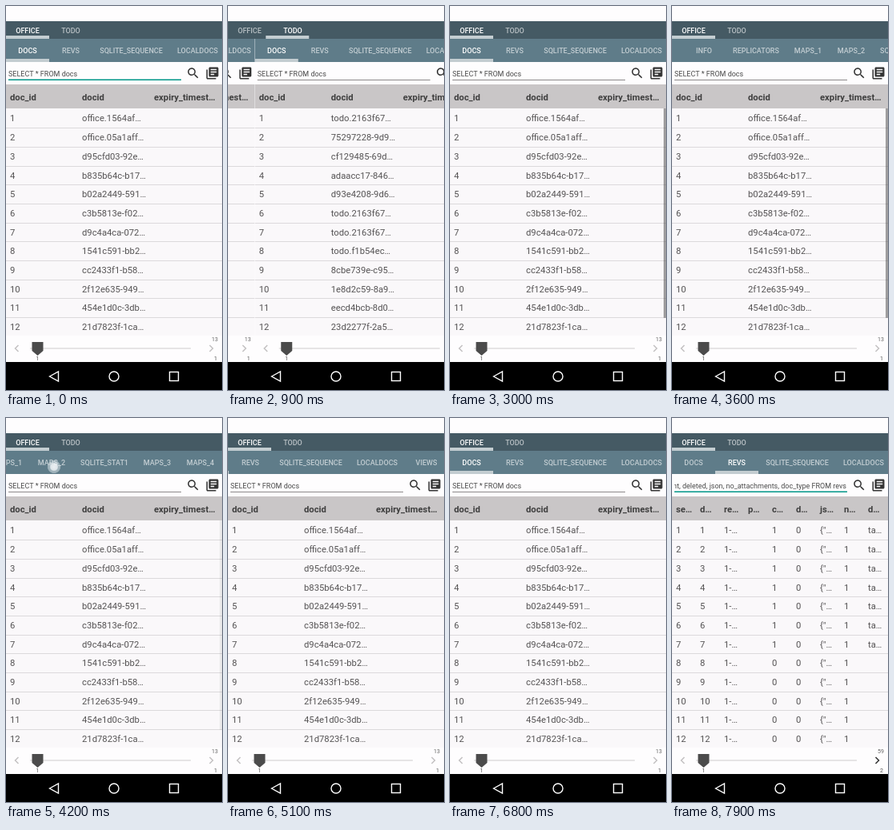
An HTML page with a canvas for the animation above (8 s loop, 270 by 480 pixels).

```html
<!DOCTYPE html>
<html lang="en">
<head>
<meta charset="utf-8">
<title>Database browser</title>
<style>
  html, body { margin: 0; width: 100%; height: 100%; overflow: hidden; background: #000; }
  canvas { display: block; width: 270px; height: 480px; }
</style>
</head>
<body>
<canvas id="stage"></canvas>
<script>
const W = 270, H = 480, LOOP = 8000, STEP = 100;
const TOP = 128, BOTTOM = 412, NAV = 445, ROW = 23.7;
const PANEL = '#fefdfe';
const canvas = document.getElementById('stage');
const ctx = canvas.getContext('2d');
const ratio = window.devicePixelRatio || 1;
canvas.width = W * ratio;
canvas.height = H * ratio;

const font = (size, weight = 400) => `${weight} ${size}px Roboto, sans-serif`;
const clamp = v => Math.max(0, Math.min(1, v));
const progress = (t, from, to) => clamp((t - from) / (to - from));
const easeOut = u => 1 - (1 - u) ** 3;
const mix = (a, b, u) => a + (b - a) * u;

function rect(x, y, w, h, color) {
  ctx.fillStyle = color;
  ctx.fillRect(x, y, w, h);
}

function text(str, x, y, face, color, align = 'left') {
  ctx.font = face;
  ctx.fillStyle = color;
  ctx.textAlign = align;
  ctx.fillText(str, x, y);
}

function path(points, closed) {
  ctx.beginPath();
  points.forEach(([x, y], i) => i ? ctx.lineTo(x, y) : ctx.moveTo(x, y));
  if (closed) ctx.closePath();
}

function stroke(color, width) {
  ctx.strokeStyle = color;
  ctx.lineWidth = width;
  ctx.stroke();
}

function clipped(x, y, w, h, draw) {
  ctx.save();
  ctx.beginPath();
  ctx.rect(x, y, w, h);
  ctx.clip();
  draw();
  ctx.restore();
}

// Piecewise linear value through [time, value] points
function track(points, t) {
  const i = points.findIndex(p => p[0] > t);
  if (i === 0) return points[0][1];
  if (i < 0) return points[points.length - 1][1];
  const [t0, a] = points[i - 1], [t1, b] = points[i];
  return mix(a, b, (t - t0) / (t1 - t0));
}

// Tab strips
function makeTabs(names) {
  ctx.font = font(9, 500);
  let x = 0;
  return names.map(name => {
    const w = Math.max(54, Math.round(ctx.measureText(name).width + 18));
    const tab = { name, x, w };
    x += w;
    return tab;
  });
}

const databases = makeTabs(['OFFICE', 'TODO']);
const tables = makeTabs(['DOCS', 'REVS', 'SQLITE_SEQUENCE', 'LOCALDOCS', 'VIEWS', 'INFO',
  'REPLICATORS', 'MAPS_1', 'MAPS_2', 'SQLITE_STAT1', 'MAPS_3', 'MAPS_4']);
const lastTab = tables[tables.length - 1];
const maxScroll = lastTab.x + lastTab.w - W;

const scrollTrack = [
  [3200, 0], [3300, 30], [3400, 110], [3500, 215], [3600, 315], [3700, 400], [3800, 455],
  [3900, maxScroll], [4200, maxScroll], [4300, maxScroll - 40], [4400, maxScroll - 125],
  [4500, maxScroll - 215], [4600, 200], [4700, 145], [4800, 105], [4900, 76], [5000, 60],
  [5100, 53], [5300, 53], [5400, 38], [5500, 15], [5600, 0]
];

// Finger contacts: start, end, from point, to point
const touches = [
  [300, 600, 80, 31, 80, 31],
  [2200, 2500, 27, 31, 27, 31],
  [3200, 3600, 235, 66, 50, 66],
  [4100, 4201, 60, 61, 60, 61],
  [4201, 4500, 60, 61, 225, 61],
  [5200, 6000, 62, 61, 243, 61],
  [7100, 7400, 80, 58, 80, 58]
];

function drawTabs(tabs, active, pos, base, bottom) {
  tabs.forEach((tab, i) => text(tab.name, tab.x + tab.w / 2, base, font(9, 500),
    i === active ? '#fff' : 'rgba(255,255,255,.62)', 'center'));
  const a = tabs[0], b = tabs[1];
  rect(mix(a.x, b.x, pos), bottom - 4, mix(a.w, b.w, pos), 4, '#c3cdd1');
}

// Table contents
const docHead = ['doc_id', 'docid', 'expiry_timest…'];
const docRows = ids => ids.split(' ').map((id, i) => [i + 1, id + '…', '']);
const officeRows = docRows('office.1564af office.05a1aff d95cfd03-92e b835b64c-b17 b02a2449-591 ' +
  'c3b5813e-f02 d9c4a4ca-072 1541c591-bb2 cc2433f1-b58 2f12e635-949 454e1d0c-3db 21d7823f-1ca');
const todoRows = docRows('todo.2163f67 75297228-9d9 cf129485-69d adaacc17-846 d93e4208-9d6 ' +
  'todo.2163f67 todo.2163f67 todo.f1b54ec 8cbe739e-c95 1e8d2c59-8a9 eecd4bcb-8d0 23d2277f-2a5');
const revRows = Array.from({ length: 12 }, (_, i) =>
  [i + 1, i + 1, '1-…', '', i < 7 ? 1 : 0, 0, '{"…', 1, i < 7 ? 'ta…' : '']);

const docsQuery = 'SELECT * FROM docs';
const office = { head: docHead, rows: officeRows, total: 13, pages: 1, query: docsQuery };
const todo = { head: docHead, rows: todoRows, total: 19, pages: 1, query: docsQuery };
const revs = {
  head: ['se…', 'd…', 're…', 'p…', 'c…', 'd…', 'js…', 'n…', 'd…'],
  rows: revRows, total: 59, pages: 2, fromEnd: true,
  query: 'SELECT sequence, doc_id, revid, parent, current, deleted, json, no_attachments, doc_type FROM revs'
};

// Icons on a 24 unit grid
const searchIcon = new Path2D('M15.5 14h-.79l-.28-.27C15.41 12.59 16 11.11 16 9.5 16 5.91 13.09 3 9.5 3' +
  'S3 5.91 3 9.5 5.91 16 9.5 16c1.61 0 3.09-.59 4.23-1.57l.27.28v.79l5 4.99L20.49 19z' +
  'm-6 0C7.01 14 5 11.99 5 9.5S7.01 5 9.5 5 14 7.01 14 9.5 11.99 14 9.5 14z');
const pagesIcon = new Path2D('M4 6H2v14c0 1.1.9 2 2 2h14v-2H4z' +
  'M20 2H8c-1.1 0-2 .9-2 2v12c0 1.1.9 2 2 2h12c1.1 0 2-.9 2-2V4c0-1.1-.9-2-2-2z' +
  'm-1 9H9V9h10zm-4 4H9v-2h6zm4-8H9V5h10z');

function drawIcon(icon, x, y) {
  ctx.save();
  ctx.translate(x, y);
  ctx.scale(.75, .75);
  ctx.fillStyle = '#333';
  ctx.fill(icon, 'evenodd');
  ctx.restore();
}

function drawQuery(data, focused) {
  rect(0, 70, W, 28, PANEL);
  clipped(3, 72, 216, 19, () => data.fromEnd
    ? text(data.query, 218, 88, font(9), '#4a4a4a', 'right')
    : text(data.query, 3, 88, font(9), '#4a4a4a'));
  if (focused) rect(3, 91.5, 216, 1.5, '#009688');
  else rect(3, 92, 216, 1, '#8b8989');
  drawIcon(searchIcon, 225, 75);
  drawIcon(pagesIcon, 249, 75);
}

function drawTable(data, barAlpha) {
  const col = W / data.head.length;
  rect(0, TOP, W, BOTTOM - TOP, '#faf8fa');
  rect(0, 98, W, TOP - 98, '#c9c6c7');
  data.head.forEach((label, i) => text(label, i * col + 5, 118, font(11.25, 700), '#3f3f3f'));
  clipped(0, TOP, W, BOTTOM - TOP, () => data.rows.forEach((cells, r) => {
    const y = TOP + r * ROW;
    const base = Math.floor(y + 16.9);
    cells.forEach((cell, i) => text(cell, i * col + 5, base, font(11.25), '#555354'));
    rect(0, Math.ceil(y + ROW), W, 1, '#dcd9dc');
  }));
  const view = BOTTOM - TOP;
  if (barAlpha > 0) rect(267, TOP, 3, view * view / (data.total * ROW), `rgba(70,70,70,${.5 * barAlpha})`);
}

function drawPager(data) {
  rect(0, BOTTOM, W, NAV - BOTTOM, PANEL);
  rect(30, 427.5, 201, 1, '#cfcccd');
  path([[32.5, 420], [46.5, 420], [46.5, 431], [39.5, 437], [32.5, 431]], true);
  ctx.fillStyle = '#4b4b4b';
  ctx.fill();
  path([[15.5, 424], [11.5, 428], [15.5, 432]]);
  stroke('#c3c1c2', 1.5);
  path([[254.5, 424], [258.5, 428], [254.5, 432]]);
  stroke(data.pages > 1 ? '#333' : '#c3c1c2', 1.5);
  text('1', 39.5, 443, font(7), '#555', 'center');
  text(data.total, 261, 418.5, font(7), '#666', 'center');
  text(data.pages, 262, 442.5, font(7), '#555', 'center');
}

function drawPage(x, page) {
  if (x <= -W || x >= W) return;
  ctx.save();
  ctx.translate(x, 0);
  clipped(0, 41, W, NAV - 41, () => {
    rect(0, 41, W, 29, '#5f7c89');
    ctx.save();
    ctx.translate(-page.scroll, 0);
    drawTabs(tables, page.tab > 0 ? 1 : 0, page.tab, 59, 70);
    ctx.restore();
    drawQuery(page.data, page.focused);
    drawTable(page.data, page.bar);
    drawPager(page.data);
  });
  ctx.restore();
}

function drawNav() {
  rect(0, NAV, W, H - NAV, '#000');
  path([[54.5, 463], [65.5, 457], [65.5, 469]], true);
  stroke('#fff', 1.4);
  ctx.beginPath();
  ctx.arc(135, 463, 6, 0, Math.PI * 2);
  stroke('#fff', 1.4);
  ctx.strokeRect(204.5, 457.5, 11, 11);
}

function drawTouch(t) {
  const hit = touches.find(([from, to]) => t >= from && t < to);
  if (!hit) return;
  const [from, to, x0, y0, x1, y1] = hit;
  const u = progress(t, from, to);
  const x = mix(x0, x1, u), y = mix(y0, y1, u);
  const glow = ctx.createRadialGradient(x, y, 0, x, y, 8.5);
  glow.addColorStop(0, 'rgba(250,252,253,.9)');
  glow.addColorStop(.5, 'rgba(245,248,250,.85)');
  glow.addColorStop(.65, 'rgba(230,238,241,.5)');
  glow.addColorStop(.9, 'rgba(230,238,241,.45)');
  glow.addColorStop(1, 'rgba(230,238,241,0)');
  ctx.fillStyle = glow;
  ctx.beginPath();
  ctx.arc(x, y, 8.5, 0, Math.PI * 2);
  ctx.fill();
}

// Scrollbars appear at a moment, rest, then fade out
const barAlpha = (t, shown) => t < shown ? 0 : 1 - progress(t, shown + 1200, shown + 1320);

function draw(t) {
  ctx.setTransform(ratio, 0, 0, ratio, 0, 0);
  rect(0, 0, W, H, PANEL);
  const pos = easeOut(progress(t, 700, 1100)) - easeOut(progress(t, 2500, 2900));
  const onRevs = t >= 7700;

  drawPage(-pos * W, {
    data: onRevs ? revs : office,
    scroll: track(scrollTrack, t),
    tab: easeOut(progress(t, 7400, 7700)),
    focused: t < 1100 || onRevs,
    bar: barAlpha(t, 2900)
  });
  drawPage((1 - pos) * W, { data: todo, scroll: 0, tab: 0, focused: false, bar: barAlpha(t, 900) });

  rect(0, 19, W, 22, '#455a64');
  drawTabs(databases, pos > .5 ? 1 : 0, pos, 34, 41);
  drawNav();
  drawTouch(t);
}

function tick() {
  const t = performance.now() % LOOP;
  draw(Math.floor(t / STEP) * STEP);
  requestAnimationFrame(tick);
}
tick();
</script>
</body>
</html>
```
